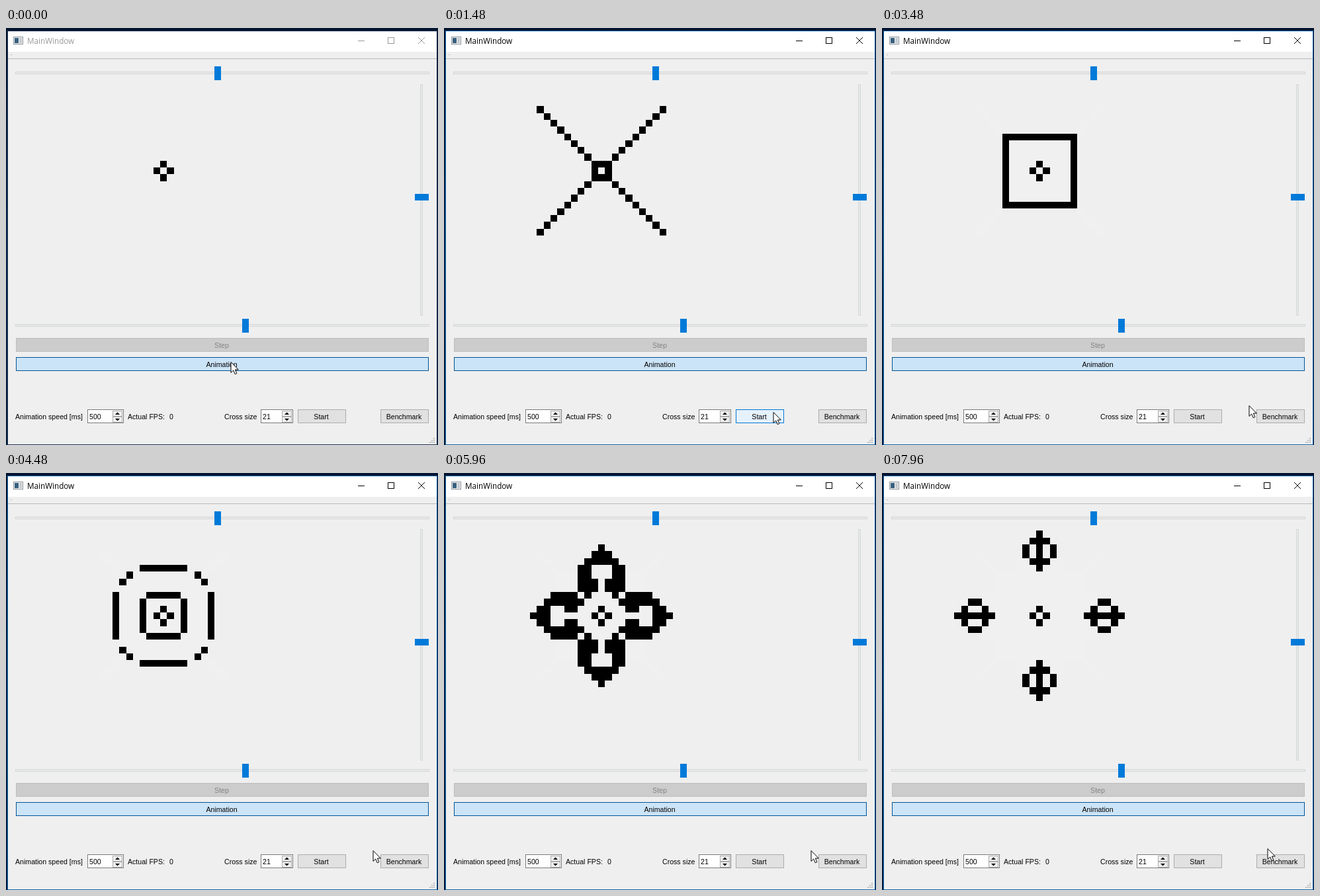
An HTML page with a canvas that plays this animation: 653x631 px, repeating every 8000 ms.

```html
<!DOCTYPE html>
<html lang="en">
<head>
<meta charset="utf-8">
<title>MainWindow</title>
<style>
html, body { margin: 0; width: 100%; height: 100%; overflow: hidden; background: #efefef; }
canvas { display: block; }
</style>
</head>
<body>
<canvas id="stage" width="653" height="631"></canvas>
<script>
const ctx = document.getElementById('stage').getContext('2d');
const LOOP = 8000;
const TICKS = [1480, 1980, 2480, 2980, 3480, 3960, 4480, 4980, 5460, 5960, 6480, 6960, 7460, 7960];
const UI_FONT = '10.6px "Liberation Sans", sans-serif';
const TITLE_FONT = '11.7px "Open Sans", sans-serif';

const STYLES = {
  normal: ['#e1e1e1', '#adadad', '#000'],
  hover: ['#e5f1fb', '#0078d7', '#000'],
  pressed: ['#cce4f7', '#005499', '#000'],
  disabled: ['#cccccc', '#bfbfbf', '#838383']
};

// Cursor position and window state, each valid from time `t` on.
const STATES = [
  { t: 0, cursor: [340, 505], active: false, step: 'disabled', animation: 'pressed', start: 'normal' },
  { t: 500, cursor: [340, 505], active: true, step: 'normal', animation: 'hover', start: 'normal' },
  { t: 980, cursor: [498, 584], active: true, step: 'disabled', animation: 'pressed', start: 'pressed' },
  { t: 1480, cursor: [498, 581], active: true, step: 'disabled', animation: 'pressed', start: 'hover' },
  { t: 1980, cursor: [555, 571], active: true, step: 'disabled', animation: 'pressed', start: 'normal' },
  { t: 7960, cursor: [583, 568], active: true, step: 'disabled', animation: 'pressed', start: 'normal' }
];

// Conway's Game of Life on a set of "x,y" keys.
const key = (x, y) => x + ',' + y;

function evolve(cells) {
  const counts = new Map();
  for (const cell of cells) {
    const [x, y] = cell.split(',').map(Number);
    for (let dx = -1; dx <= 1; dx++) {
      for (let dy = -1; dy <= 1; dy++) {
        if (!dx && !dy) continue;
        const k = key(x + dx, y + dy);
        counts.set(k, (counts.get(k) || 0) + 1);
      }
    }
  }
  const next = new Set();
  for (const [k, n] of counts) {
    if (n === 3 || (n === 2 && cells.has(k))) next.add(k);
  }
  return next;
}

function diagonalCross(size) {
  const half = (size - 1) / 2, cells = new Set();
  for (let i = -half; i <= half; i++) {
    cells.add(key(i, i));
    cells.add(key(i, -i));
  }
  return cells;
}

const tub = new Set(['0,-1', '-1,0', '1,0', '0,1']);
const generations = [{ alive: tub, touched: new Set([...tub, '0,0']) }];
let cells = diagonalCross(21);
for (const _ of TICKS) {
  cells = evolve(cells);
  const touched = new Set([...generations[generations.length - 1].touched, ...cells]);
  generations.push({ alive: cells, touched });
}

function rect(x, y, w, h, color) {
  ctx.fillStyle = color;
  ctx.fillRect(x, y, w, h);
}

function box(x, y, w, h, fill, border) {
  rect(x, y, w, h, border);
  rect(x + 1, y + 1, w - 2, h - 2, fill);
}

function text(str, x, y, color = '#000', align = 'left', font = UI_FONT) {
  ctx.font = font;
  ctx.textAlign = align;
  ctx.fillStyle = color;
  ctx.fillText(str, x, y);
}

function polygon(points) {
  ctx.beginPath();
  points.forEach(([x, y]) => ctx.lineTo(x, y));
  ctx.closePath();
}

function button(label, x, y, w, style) {
  const [fill, border, color] = STYLES[style];
  box(x, y, w, 21, fill, border);
  text(label, x + w / 2 - 1, y + 15, color, 'center');
}

function spinBox(value, x, w) {
  box(x, 577, w, 21, '#fff', '#7a7a7a');
  text(value, x + 3, 592);
  const bx = x + w - 17;
  for (const [y, dir] of [[579, -1], [588, 1]]) {
    box(bx, y, 15, 9, '#f0f0f0', '#adadad');
    const cx = bx + 7.5, cy = y + 4.5;
    polygon([[cx - 3.5, cy - dir * 1.5], [cx + 3.5, cy - dir * 1.5], [cx, cy + dir * 2]]);
    ctx.fillStyle = '#000';
    ctx.fill();
  }
}

function drawFrame(active) {
  const desktop = ctx.createLinearGradient(0, 0, 0, 631);
  desktop.addColorStop(0, '#03142f');
  desktop.addColorStop(0.5, '#06264f');
  desktop.addColorStop(1, '#041c3e');
  rect(0, 0, 653, 631, desktop);
  box(2, 4, 650, 627, '#efefef', active ? '#0f66ab' : '#1c3350');
  rect(3, 5, 648, 31, '#fff');
  rect(3, 46, 648, 1, '#b9b9b9');
  rect(7, 40, 2, 1, '#b5b5b5');

  box(11, 13, 15, 12, '#f4f4f4', '#8c9399');
  rect(13, 15, 6, 8, '#37607f');
  rect(20, 15, 4, 8, '#c5cbd0');

  const ink = active ? '#000' : '#999';
  text('MainWindow', 32, 24, ink, 'left', TITLE_FONT);
  rect(532, 19, 10, 1, ink);
  box(577, 14, 10, 10, '#fff', ink);
  ctx.strokeStyle = ink;
  ctx.lineWidth = 1;
  ctx.beginPath();
  ctx.moveTo(623, 14);
  ctx.lineTo(633, 24);
  ctx.moveTo(633, 14);
  ctx.lineTo(623, 24);
  ctx.stroke();

  for (let i = 0; i < 3; i++) {
    for (let j = 2 - i; j < 3; j++) rect(640 + i * 3, 620 + j * 3, 2, 2, '#bfbfbf');
  }
}

function drawSliders() {
  const groove = (x, y, w, h) => box(x, y, w, h, '#e7eaea', '#d6d6d6');
  groove(14, 66, 626, 4);
  groove(14, 448, 626, 4);
  groove(626, 85, 4, 350);
  rect(315, 58, 10, 21, '#007ad9');
  rect(357, 440, 10, 21, '#007ad9');
  rect(618, 251, 21, 10, '#007ad9');
}

function drawCells(set, color) {
  const edge = (start, i) => Math.round(start + i * 10.3);
  for (const cell of set) {
    const [x, y] = cell.split(',').map(Number);
    const left = edge(233, x), top = edge(211, y);
    rect(left, top, edge(233, x + 1) - left, edge(211, y + 1) - top, color);
  }
}

function drawControls(state) {
  button('Step', 15, 469, 624, state.step);
  button('Animation', 15, 498, 624, state.animation);
  text('Animation speed [ms]', 14, 592);
  spinBox('500', 123, 55);
  text('Actual FPS:', 184, 592);
  text('0', 247, 592);
  text('Cross size', 330, 592);
  spinBox('21', 385, 49);
  button('Start', 441, 577, 73, state.start);
  button('Benchmark', 566, 577, 73, 'normal');
}

function drawCursor([x, y]) {
  ctx.save();
  ctx.translate(x, y);
  polygon([[0, 0.5], [0, 16.5], [3.7, 13], [6.2, 18.8], [8.8, 17.7], [6.4, 12], [11.3, 12]]);
  ctx.fillStyle = '#fff';
  ctx.fill();
  ctx.strokeStyle = '#000';
  ctx.lineWidth = 1;
  ctx.stroke();
  ctx.restore();
}

function draw(t) {
  const state = STATES.filter(s => s.t <= t).pop();
  const { alive, touched } = generations[TICKS.filter(tick => tick <= t).length];
  drawFrame(state.active);
  drawSliders();
  drawCells(touched, '#f0f0f0');
  drawCells(alive, '#000');
  drawControls(state);
  drawCursor(state.cursor);
}

const begin = performance.now();
function loop() {
  draw((performance.now() - begin) % LOOP);
  requestAnimationFrame(loop);
}
loop();
</script>
</body>
</html>
```
